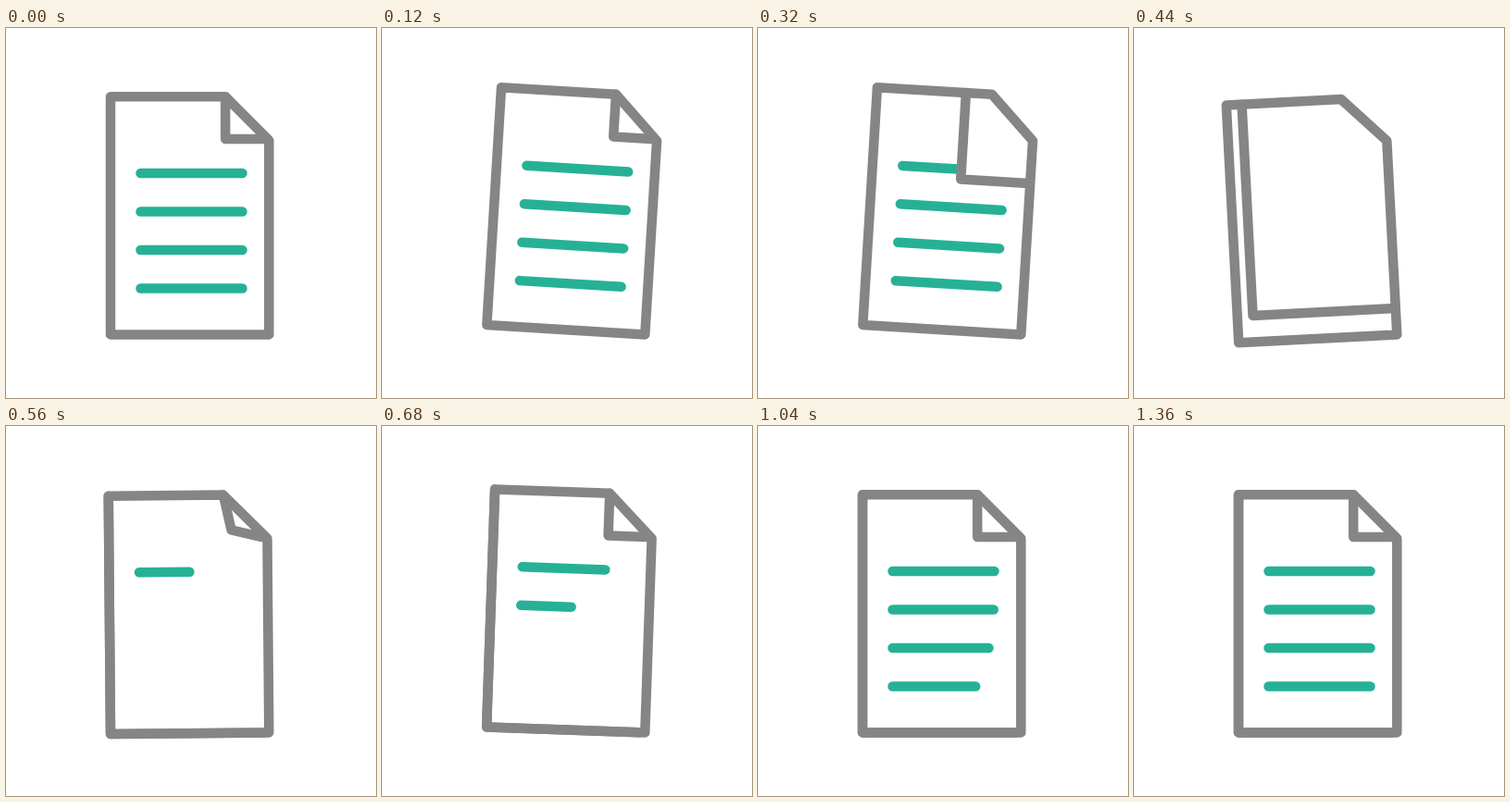
Animation, 400 px wide and 400 px high, one loop 1960 ms. Source, as an HTML page with a canvas:

```html
<!DOCTYPE html>
<html lang="en">
<head>
<meta charset="utf-8">
<title>Page turn</title>
<style>
  html, body { margin: 0; width: 100%; height: 100%; overflow: hidden; background: #fff; }
  canvas { display: block; width: 400px; height: 400px; }
</style>
</head>
<body>
<canvas id="stage"></canvas>
<script>
const LOOP = 1960, STEP = 40;
const GRAY = '#858585', TEAL = '#26b197', STROKE = 10.5;
const page = { left: 113, top: 74.2, right: 284.3, bottom: 331.4 };
const corner = { x: 237.2, y: 120 };
const foldEnd = 278.5;
const lineStart = 145.5, lineLength = 110;
const lineRows = [157, 198.5, 240, 281.5];
const swing = [[0, 0], [240, 7], [440, -3], [680, 2], [920, 0]];

const canvas = document.getElementById('stage');
const ctx = canvas.getContext('2d');
const ratio = window.devicePixelRatio || 1;
canvas.width = canvas.height = 400 * ratio;

const mix = (a, b, p) => a + (b - a) * p;
const progress = (t, from, to) => Math.min(1, Math.max(0, (t - from) / (to - from)));
const smooth = p => p * p * (3 - 2 * p);

function bezier(x1, y1, x2, y2) {
  const at = (a, b, s) => 3 * (1 - s) * (1 - s) * s * a + 3 * (1 - s) * s * s * b + s * s * s;
  return p => {
    if (p <= 0 || p >= 1) return p;
    let low = 0, high = 1;
    for (let i = 0; i < 24; i++) {
      const mid = (low + high) / 2;
      if (at(x1, x2, mid) < p) low = mid; else high = mid;
    }
    return at(y1, y2, low);
  };
}
const writeEase = bezier(0.25, 0.5, 0.27, 1);

function angleAt(t) {
  for (let i = 1; i < swing.length; i++) {
    const [from, a] = swing[i - 1], [to, b] = swing[i];
    if (t < to) return mix(a, b, smooth(progress(t, from, to)));
  }
  return 0;
}

function trace(points, closed) {
  ctx.beginPath();
  points.forEach(([x, y]) => ctx.lineTo(x, y));
  if (closed) ctx.closePath();
}

function stroke(points, color, closed) {
  trace(points, closed);
  ctx.strokeStyle = color;
  ctx.stroke();
}

function drawLine(y, p) {
  if (p > 0) stroke([[lineStart, y], [lineStart + lineLength * p, y]], TEAL);
}

// The folded corner sweeps across the page and hides the old text.
function drawTurningSheet(p) {
  const x = mix(corner.x, page.left, p), y = mix(corner.y, page.bottom, p);
  const edge = [[x, page.top], [x, y], [foldEnd, y]];
  trace([...edge, [page.right, corner.y], [corner.x, page.top]], true);
  ctx.fillStyle = '#fff';
  ctx.fill();
  stroke(edge, GRAY);
}

function drawNewFold(p) {
  const x = mix((corner.x + page.right) / 2, corner.x, p);
  const y = mix((page.top + corner.y) / 2, corner.y, p);
  stroke([[corner.x, page.top], [x, y], [foldEnd, corner.y]], GRAY);
}

function draw(t) {
  ctx.setTransform(ratio, 0, 0, ratio, 0, 0);
  ctx.fillStyle = '#fff';
  ctx.fillRect(0, 0, 400, 400);
  ctx.lineWidth = STROKE;
  ctx.lineCap = ctx.lineJoin = 'round';

  ctx.translate(page.right, page.bottom);
  ctx.rotate(angleAt(t) * Math.PI / 180);
  ctx.translate(-page.right, -page.bottom);

  const turn = smooth(progress(t, 240, 500));
  if (turn < 1) lineRows.forEach(y => drawLine(y, 1));
  drawTurningSheet(turn);
  if (t > 440) drawNewFold(smooth(progress(t, 440, 640)));
  stroke([
    [page.left, page.top], [corner.x, page.top], [page.right, 121.5],
    [page.right, page.bottom], [page.left, page.bottom]
  ], GRAY, true);
  lineRows.forEach((y, i) => {
    const start = 440 + i * 120;
    drawLine(y, writeEase(progress(t, start, start + 560)));
  });
}

const began = performance.now();
function tick() {
  const t = (performance.now() - began) % LOOP;
  draw(Math.floor(t / STEP) * STEP);
  requestAnimationFrame(tick);
}
tick();
</script>
</body>
</html>
```
